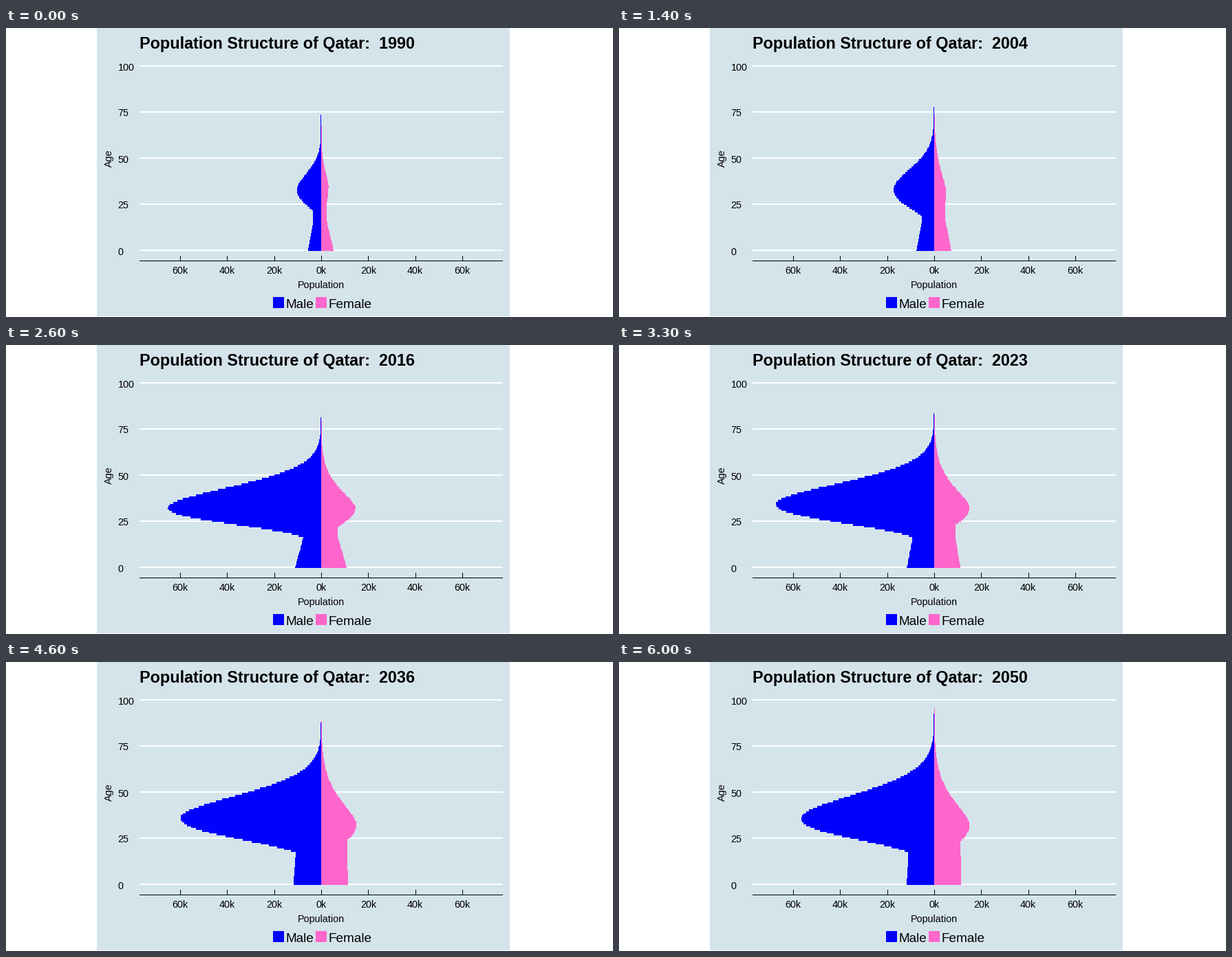
A matplotlib script that plays this animation: 882 px wide and 420 px high, repeating every 6700 ms.

```python
import numpy as np
import matplotlib.pyplot as plt
from matplotlib.animation import FuncAnimation
from matplotlib.patches import Polygon, Rectangle

W, H, DPI = 882, 420, 100
MID, BASE, STEP = 458, 323, 2.68      # centre line, y of age 0, px per year of age
BLUE, PINK, PANEL = "#0000ff", "#ff66cc", "#d5e4eb"
FIRST, LAST = 1990, 2050
TEEN_AGE = 16

# How each side's shape drifts between a few key years. Lengths are in px:
# children at birth and as teens; the adult bulge has the age of its peak and
# a spread in years towards the young and the old.
KEYS = [1990, 1997, 2009, 2016, 2030, 2042]
MALE = dict(
    birth=[19, 18.5, 31, 38, 41, 40],
    teen=[11.5, 15, 20, 26, 37, 37.5],
    peak=[33, 38, 30, 32.5, 36.5, 36],
    young=[11.5, 17.5, 11.5, 11.8, 15.4, 15.2],
    old=[13, 11.6, 18.5, 15.9, 16.3, 18.5],
)
FEMALE = dict(
    birth=[18, 18, 30, 37, 39.5, 39],
    teen=[8, 12, 19.5, 24.5, 37, 38.5],
    peak=[35, 35, 29.5, 32.7, 33, 33],
    young=[17, 24, 11.5, 12.5, 14, 16],
    old=[11.6, 16, 17.7, 14, 18, 18],
)


def rise(year, middle, pace):
    """Smooth step from 0 to 1 around the middle year."""
    return 1 / (1 + np.exp((middle - year) / pace))


def bars(year, shape, height, fall, tip):
    """Bar length in whole px for every age up to the tip."""
    now = {name: np.interp(year, KEYS, row) for name, row in shape.items()}
    ages = np.arange(round(tip))
    gap = ages - now["peak"]
    bulge = height * np.where(gap < 0,
                              np.exp(-(np.abs(gap) / now["young"]) ** 2.4),
                              np.exp(-(np.abs(gap) / now["old"]) ** fall))
    children = np.interp(ages, [0, TEEN_AGE], [now["birth"], now["teen"]])
    children[gap >= 0] = 0
    return np.maximum(np.round(np.maximum(bulge, children)), 1)


def men(year):
    height = 35 + 200 * rise(year, 2009, 2.5) - 42 * rise(year, 2032, 4)
    return bars(year, MALE, height, 1.8, 73.7 + 0.315 * (year - FIRST))


def women(year):
    height = 10.5 + 41 * rise(year, 2008, 2.5)
    return bars(year, FEMALE, height, 1.45, 67.6 + 0.467 * (year - FIRST))


def stairs(lengths, side):
    """Outline of stacked bars on one side of the centre line."""
    edges = np.round(BASE - STEP * (np.arange(len(lengths) + 1) - 0.5))
    ys = np.repeat(edges, 2)[1:-1]
    xs = MID + side * np.repeat(lengths, 2)
    return np.vstack([[MID, ys[0]], np.column_stack([xs, ys]), [MID, ys[-1]]])


fig = plt.figure(figsize=(W / DPI, H / DPI), dpi=DPI, facecolor="white")
ax = fig.add_axes([0, 0, 1, 1])
ax.set_xlim(0, W)
ax.set_ylim(H, 0)
ax.axis("off")


def box(x, y, w, h, color, z=1):
    ax.add_patch(Rectangle((x, y), w, h, fc=color, lw=0,
                           antialiased=False, zorder=z))


def label(x, y, text, px=14.4, **style):
    style = {"va": "baseline", **style}
    return ax.text(x, y, text, fontsize=px * 72 / DPI, color="black",
                   family="Liberation Sans", zorder=5, **style)


def side(color):
    return ax.add_patch(Polygon([[0, 0]] * 3, fc=color, lw=0,
                                antialiased=False, zorder=2))


box(132, 0, 600, 419, PANEL, 0)
for age in range(0, 101, 25):
    y = BASE - STEP * age
    box(194, round(y) - 1, 528, 2, "white")
    label(162.5, y + 6.5, str(age))

box(194, 338, 528, 1, "black", 3)
for n in range(-3, 4):
    x = MID + n * 68.33
    box(round(x), 331, 1, 7, "black", 3)
    label(x, 357, f"{abs(n) * 20}k", ha="center")

label(MID, 378, "Population", ha="center")
label(150.4, 189, "Age", rotation=90, ha="center", va="center")
for x, color, name in [(388, BLUE, "Male"), (450, PINK, "Female")]:
    box(x, 391, 16, 16, color)
    label(x + 18, 407, name, 19)

title = label(193.5, 30, "", 23.35, weight="bold")
male, female = side(BLUE), side(PINK)


def update(i):
    year = min(FIRST + i, LAST)
    title.set_text(f"Population Structure of Qatar:  {year}")
    male.set_xy(stairs(men(year), -1))
    female.set_xy(stairs(women(year), 1))
    return title, male, female


anim = FuncAnimation(fig, update, frames=67, interval=100, repeat=True,
                     repeat_delay=0, blit=False)
plt.show()
```
